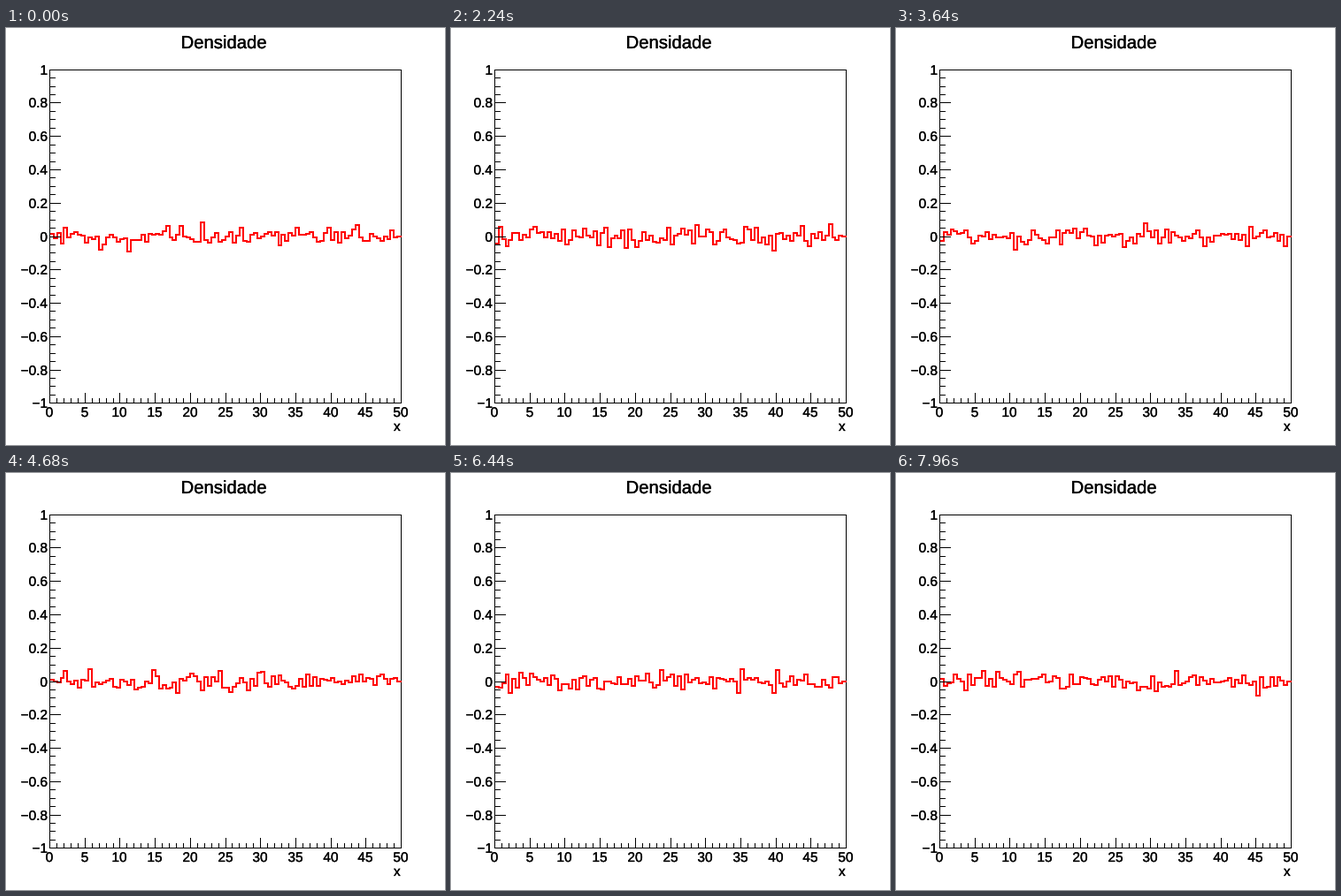
Animation, 496 px wide and 472 px high, one loop 8 s. Source, as a matplotlib script:

```python
import numpy as np
import matplotlib.pyplot as plt
from matplotlib.animation import FuncAnimation
from matplotlib.collections import LineCollection
from matplotlib.patheffects import withStroke

W, H, DPI = 496, 472, 64
FRAMES, INTERVAL = 200, 40
BINS, X_MAX = 100, 50
SIGMA, PEAK = 0.03, 0.115
PT = 72 / DPI  # points per pixel

plt.rcParams["font.family"] = "Liberation Sans"
fig = plt.figure(figsize=(W / DPI, H / DPI), dpi=DPI, facecolor="white")
ax = fig.add_axes([0, 0, 1, 1])
ax.set(xlim=(0, W), ylim=(H, 0))
ax.axis("off")


def px(x):
    return 0.1 * W + 0.8 * W * np.asarray(x) / X_MAX


def py(y):
    return 0.1 * H + 0.4 * H * (1 - np.asarray(y))


def label(x, y, text, size=15.4, ha="center"):
    # A hairline stroke gives the letters their slightly heavy look.
    ax.text(x, y, text, fontsize=size * PT, ha=ha, va="baseline", color="black",
            path_effects=[withStroke(linewidth=0.3 * PT, foreground="black")])


def hline(x0, x1, row):
    return [(x0, row + 0.5), (x1, row + 0.5)]


def vline(col, y0, y1):
    return [(col + 0.5, y0), (col + 0.5, y1)]


def draw(lines, zorder):
    ax.add_collection(LineCollection(lines, colors="black", linewidths=PT,
                                     zorder=zorder, snap=False))


left, right = int(px(0)), int(px(X_MAX))
top, bottom = int(py(1)), int(py(-1))

frame = [hline(left, right + 1, top), vline(right, top, bottom + 1)]
axes = [hline(left, right + 1, bottom), vline(left, top, bottom + 1)]

for v in range(X_MAX + 1):
    col = int(px(v))
    major = v % 5 == 0
    axes.append(vline(col, bottom - (11 if major else 5), bottom))
    if major:
        label(col, 440, str(v))

for k in range(-20, 21):
    row = int(py(k / 20))
    major = k % 4 == 0
    axes.append(hline(left, left + (13 if major else 7), row))
    if major:
        label(47, row + 5.8, f"{k / 20:g}".replace("-", "\u2212"), ha="right")

# The curve covers the frame's right side but passes under the axes.
draw(frame, 1)
draw(axes, 3)
label(246, 23, "Densidade", size=20.3)
label(445.7, 456, "x", ha="right")

# Fresh statistical noise around zero at every step; the last bin stays empty.
rng = np.random.default_rng(50)
density = rng.normal(0, SIGMA, (FRAMES, BINS))
density -= density.mean(axis=1, keepdims=True)
density = np.clip(density, -PEAK, PEAK)
density[:, -1] = 0

edges = np.round(px(np.linspace(0, X_MAX, BINS + 1)))
step_x = np.repeat(edges, 2)[1:-1]
curve, = ax.plot([], [], color="red", linewidth=2 * PT, zorder=2, snap=False,
                 solid_capstyle="projecting", solid_joinstyle="miter")


def update(i):
    curve.set_data(step_x, np.repeat(np.round(py(density[i])), 2))
    return curve,


anim = FuncAnimation(fig, update, frames=FRAMES, interval=INTERVAL,
                     repeat=True, repeat_delay=0)
plt.show()
```
